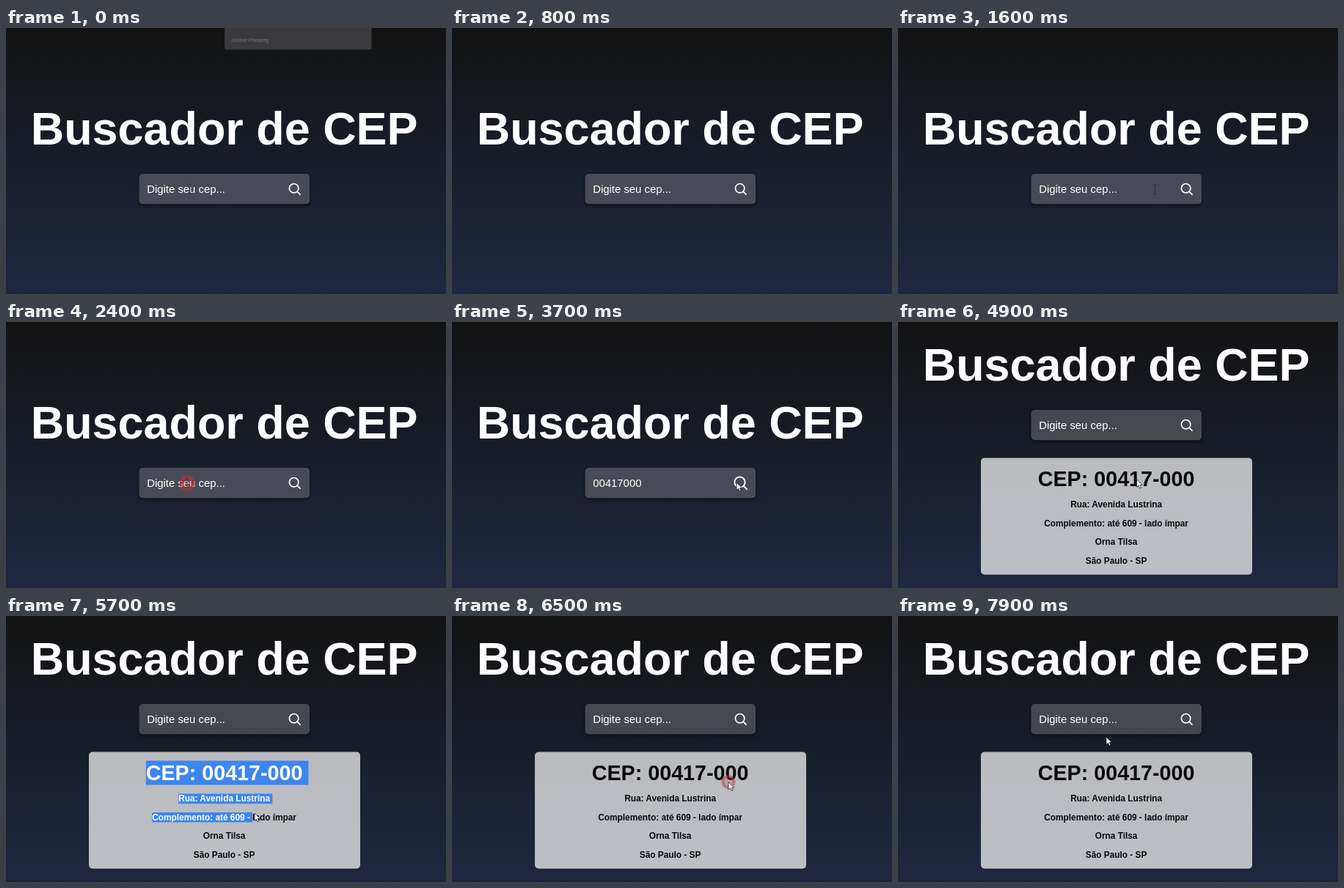
These frames come from a looping animation (600x363 px, 8000 ms). An HTML page:

```html
<!DOCTYPE html>
<html lang="pt-BR">
<head>
<meta charset="utf-8">
<title>Buscador de CEP</title>
<style>
  html, body { margin: 0; width: 100%; height: 100%; overflow: hidden; background: #121212; }
  svg { display: block; width: 100%; height: 100%; }
  text { font-family: "Liberation Sans", Arial, sans-serif; white-space: pre; }
  .bold { font-weight: bold; text-anchor: middle; }
  .small { font-family: Roboto, sans-serif; font-size: 7px; }
</style>
</head>
<body>
<svg viewBox="0 0 600 363">
  <defs>
    <linearGradient id="sky" x2="0" y2="1">
      <stop stop-color="#121212"/>
      <stop offset="1" stop-color="#1f2840"/>
    </linearGradient>
    <filter id="soft" x="-10%" y="-40%" width="120%" height="180%">
      <feGaussianBlur stdDeviation="2"/>
    </filter>
    <clipPath id="selClip"></clipPath>
  </defs>
  <rect width="600" height="363" fill="url(#sky)"/>

  <g id="popup">
    <rect x="298" y="-4" width="200.5" height="33.5" rx="2" fill="#3a3a3c"/>
    <text class="small" x="307" y="18.5" fill="#757577">Zelmor Phrasing</text>
  </g>

  <g id="search">
    <text class="bold" x="297.6" y="158.8" font-size="62.9" fill="#fff">Buscador de CEP</text>
    <rect x="181.5" y="201" width="232.500" height="41" rx="5" opacity=".55" filter="url(#soft)"/>
    <rect id="field" x="181.5" y="199" width="232.5" height="41.3" rx="5"/>
    <text id="entry" x="192.2" y="225" font-size="14.9" fill="#fff"></text>
    <g id="icon" fill="none" stroke="#fff" stroke-width="1.9">
      <circle cx="10" cy="10" r="7"/>
      <path d="M15 15 20 20"/>
    </g>
  </g>

  <g id="card">
    <rect x="113" y="185.5" width="370" height="159.3" rx="5" fill="#fff" opacity=".7"/>
    <g id="plain" fill="#0a0a0c"></g>
    <g clip-path="url(#selClip)">
      <rect x="113" y="185" width="370" height="160" fill="#3d86ee"/>
      <g id="picked" fill="#fff"></g>
    </g>
  </g>

  <circle id="ring" fill="#c8323c" fill-opacity=".25" stroke="#b8323c" stroke-width="4" stroke-dasharray="1.5 1"/>
  <path id="beam" d="M-2-7H2M0-7V6M-2 6H2" fill="none" stroke="#25262b" opacity=".6"/>
  <path id="arrow" d="M0 0V10.5L2.5 8.3 4.1 12 5.9 11.2 4.3 7.6H7.5Z" fill="#fff" stroke="#1a1a1e" stroke-width=".8"/>
</svg>
<script>
const LOOP = 8000, STEP = 100;
const CODE = '00417-000';
const MIDDLE = 297.6;
const TYPE_AT = 2400, FOUND_AT = 3900, DRAG_AT = 5600, DROP_AT = 5900, CLEAR_AT = 6400;
const CLICKS = [TYPE_AT, 3800, CLEAR_AT];
const TRAVEL = 800, RING_TIME = 300;

// where the pointer comes to rest, and when
const stops = [
  { at: 0, x: 251, y: 220 },
  { at: 800, x: 259, y: 222 },
  { at: 1900, x: 393, y: 220 },
  { at: 2200, x: 247, y: 220 },
  { at: 3700, x: 388, y: 219 },
  { at: 5400, x: 191, y: 206 },
  { at: 5700, x: 339, y: 269 },
  { at: DROP_AT, x: 338, y: 314 },
  { at: CLEAR_AT, x: 377, y: 226.5 },
  { at: 7300, x: 388, y: 141 },
  { at: 7900, x: 284, y: 165 }
];

const $ = id => document.getElementById(id);
const clamp = (v, a = 0, b = 1) => Math.min(b, Math.max(a, v));
const ease = k => k * k * (3 - 2 * k);
const during = (t, a, b) => t >= a && t < b;
const show = (el, on) => el.setAttribute('visibility', on ? 'visible' : 'hidden');

function set(el, attrs) {
  for (const k in attrs) el.setAttribute(k, attrs[k]);
  return el;
}

function make(tag, attrs, parent) {
  const el = document.createElementNS('http://www.w3.org/2000/svg', tag);
  return parent.appendChild(set(el, attrs));
}

const rows = [
  'CEP: ' + CODE,
  'Rua: Avenida Lustrina',
  'Complemento: até 609 - lado ímpar',
  'Orna Tilsa',
  'São Paulo - SP'
].map((label, i) => {
  const size = i ? 11.85 : 28.7;
  const base = i ? 228 + i * 25.4 : 224;
  const attrs = { class: 'bold', x: MIDDLE, y: base, 'font-size': size };
  const el = make('text', attrs, $('plain'));
  el.textContent = label;
  make('text', attrs, $('picked')).textContent = label;
  const top = base - size * 0.92;
  const bar = make('rect', { y: top, height: size * 1.15 }, $('selClip'));
  return { el, bar, size, top };
});

function pointer(t) {
  const next = stops.findIndex(s => s.at > t);
  if (next < 0) return stops[stops.length - 1];
  const a = stops[next - 1], b = stops[next];
  const leave = Math.max(a.at, b.at - TRAVEL);
  const k = ease(clamp((t - leave) / (b.at - leave)));
  return { x: a.x + (b.x - a.x) * k, y: a.y + (b.y - a.y) * k };
}

function drawSelection(t) {
  const on = during(t, DRAG_AT, CLEAR_AT);
  const end = pointer(Math.min(t, DROP_AT));
  const last = rows.filter(r => r.top <= end.y).length - 1;
  rows.forEach(({ el, bar, size }, i) => {
    const full = el.getComputedTextLength();
    const left = MIDDLE - full / 2;
    let width = 0;
    if (on && i < last) width = full + size * 0.278;
    if (on && i === last) {
      // stop at the last whole character before the pointer
      for (let n = 1; n <= el.getNumberOfChars(); n++) {
        const edge = el.getSubStringLength(0, n);
        if (left + edge < end.x) width = edge;
      }
    }
    set(bar, { x: left, width });
  });
}

// returns whether the search icon is hovered
function drawPointer(t, fieldTop) {
  const { x, y } = pointer(t);
  const inField = during(x, 181, 414) && during(y, fieldTop, fieldTop + 41);
  const onIcon = inField && x > 382;
  const beam = inField && !onIcon;
  const stale = during(t, FOUND_AT, FOUND_AT + 200);
  for (const id of ['beam', 'arrow']) set($(id), { transform: `translate(${x} ${y})` });
  show($('beam'), beam && !stale);
  show($('arrow'), !beam && !stale);
  return onIcon || stale;
}

function drawRing(t) {
  const click = CLICKS.find(c => during(t, c, c + RING_TIME));
  show($('ring'), click);
  if (!click) return;
  const p = (t - click) / RING_TIME;
  const { x, y } = pointer(click);
  set($('ring'), { cx: x, cy: y, r: 9 * (1 - p * p) - 0.5, opacity: 1 - 0.7 * p });
}

function draw(time) {
  const t = Math.floor(time / STEP) * STEP;
  const found = t >= FOUND_AT;
  const shift = found ? -79 : 0;

  set($('popup'), { opacity: clamp((600 - t) / 600) });
  set($('search'), { transform: `translate(0 ${shift})` });
  set($('field'), { fill: found ? '#46484f' : '#484b55' });

  const typed = found ? 0 : clamp((t - TYPE_AT) / STEP, 0, 8);
  $('entry').textContent = typed ? CODE.replace('-', '').slice(0, typed) : 'Digite seu cep...';

  show($('card'), found);
  drawSelection(t);
  const zoom = drawPointer(t, 199 + shift) ? 1.02 : 0.89;
  set($('icon'), { transform: `translate(393.5 219.6) scale(${zoom}) translate(-11 -11)` });
  drawRing(t);
}

const start = performance.now();
function tick() {
  draw((performance.now() - start) % LOOP);
  requestAnimationFrame(tick);
}
tick();
</script>
</body>
</html>
```
